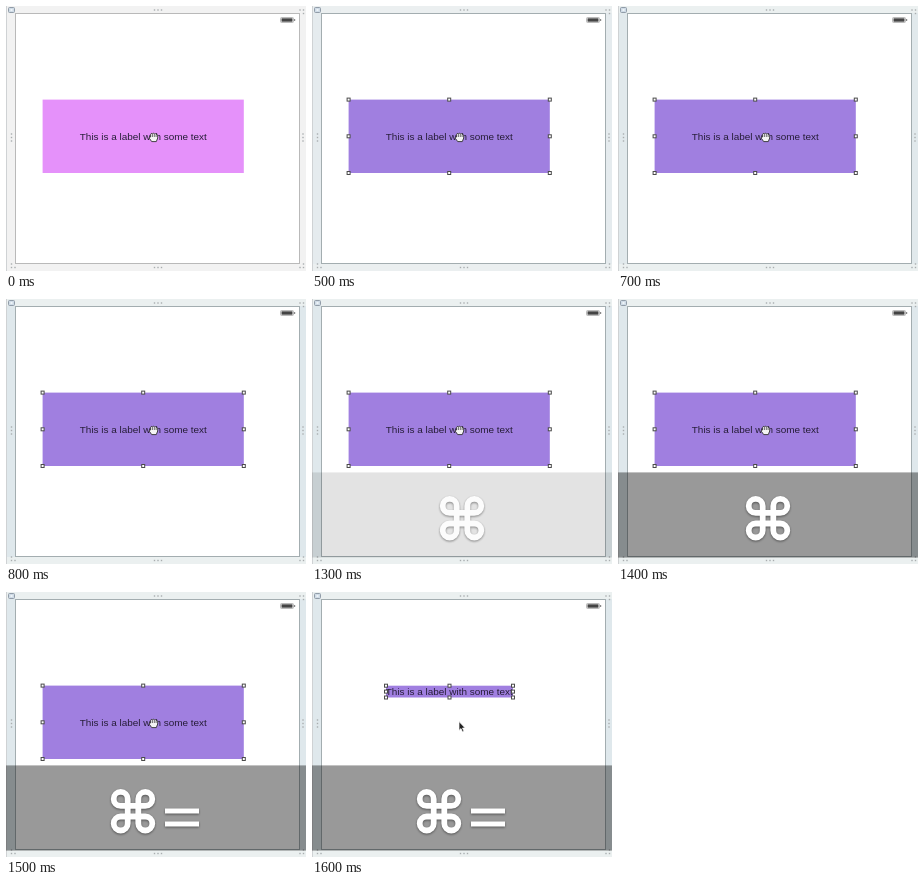
Write an HTML page that moves like this. It is 300 px wide and 265 px high and loops after 2 s.

```html
<!DOCTYPE html>
<html lang="en">
<head>
<meta charset="utf-8">
<title>Size to fit</title>
<style>
  html, body { margin: 0; width: 100%; height: 100%; overflow: hidden; background: #f2f2f2; }
  svg { display: block; width: 300px; height: 265px; }
  text { font: 9.95px "Liberation Sans", Arial, sans-serif; fill: #261d38; }
  .handle { fill: #fff; stroke: #4a4a4a; stroke-width: 1; }
  .keys { fill: none; stroke: #fff; stroke-width: 5.8; filter: drop-shadow(0 1px 1px rgba(0, 0, 0, .45)); }
</style>
</head>
<body>
<svg viewBox="0 0 300 265">
  <rect id="gutter" width="300" height="265"/>
  <path id="rails" d="M0 0H300V7H0ZM0 258H300V265H0Z"/>
  <path d="M.5 0V265" stroke="#cfd2d4"/>
  <rect id="board" x="9.5" y="7.5" width="284" height="250" fill="#fff"/>
  <g id="dots" fill="#a9adaf"></g>
  <rect x="2.5" y="1.5" width="6" height="5" rx="1" fill="#cfdbe6" stroke="#919ca8"/>
  <rect x="4.5" y="3" width="2" height="2" fill="#eef3f7"/>

  <rect x="274.5" y="11.5" width="13" height="5" rx="1" fill="#fff" stroke="#aaa" stroke-width=".8"/>
  <rect x="275.5" y="12.3" width="11" height="3.4" fill="#444"/>
  <rect x="288" y="13" width="1.2" height="2" fill="#888"/>

  <rect id="label"/>
  <text id="caption" x="73.8">This is a label with some text</text>
  <g id="handles"></g>

  <g id="hand" stroke="#333" stroke-width=".9" stroke-linejoin="round" fill="#f4f4f4">
    <path d="M144.6 131V128.2Q145.3 126.8 146.3 127.8Q147.2 126.6 148.3 127.8Q149.4 127 150.2 128.4Q151.7 128.2 151.7 129.8V132L150.3 135.6H145.7L143.3 132.2Q142.9 130.6 144.6 131Z"/>
    <path d="M146.4 128.2V131M148.3 128.2V131M150.1 128.7V131" stroke-width=".7"/>
  </g>
  <path id="arrow" d="M147 129.6V138.4L149 136.6L150.5 140L152 139.3L150.5 136H153.2Z" fill="#222" stroke="#fff" stroke-width=".7"/>

  <rect id="shade" y="173.4" width="300" height="85.2"/>
  <g id="keys" class="keys">
    <path id="command" d=""/>
    <path id="equals" d="M159 219H193M159 232H193" stroke-width="5.2"/>
  </g>
</svg>
<script>
  const LOOP = 2000;
  const $ = id => document.getElementById(id);
  const set = (id, attrs) => {
    for (const name in attrs) $(id).setAttribute(name, attrs[name]);
  };
  const show = (id, on) => set(id, { visibility: on ? "visible" : "hidden" });
  const make = (parent, attrs) => {
    const el = document.createElementNS("http://www.w3.org/2000/svg", "rect");
    for (const name in attrs) el.setAttribute(name, attrs[name]);
    $(parent).append(el);
    return el;
  };

  const dot = (x, y) => make("dots", { x: x - .7, y: y - .7, width: 1.4, height: 1.4 });
  for (const step of [-3.5, 0, 3.5]) {
    dot(152 + step, 4);
    dot(152 + step, 261.5);
    dot(5.5, 131.5 + step);
    dot(297, 131.5 + step);
  }
  const corners = [[297.5, 4, -1, 1], [5.5, 261.5, 1, -1], [297.5, 261.5, -1, -1]];
  for (const [x, y, dx, dy] of corners) {
    dot(x, y);
    dot(x + 3.5 * dx, y);
    dot(x, y + 3.5 * dy);
  }

  // Four looped corners joined into one square
  const h = 5.3, r = 7, far = h + r;
  const loops = [[-1, -1], [1, -1], [1, 1], [-1, 1]].map(([sx, sy]) =>
    `M${sx * h} ${sy * h}H${sx * far}A${r} ${r} 0 1 ${sx * sy > 0 ? 1 : 0} ${sx * h} ${sy * far}V${sy * h}`);
  set("command", { d: `${loops.join("")}M${-h} ${-h}H${h}V${h}H${-h}Z` });

  const spots = [[0, 0], [.5, 0], [1, 0], [0, .5], [1, .5], [0, 1], [.5, 1], [1, 1]];
  const handles = spots.map(() => make("handles", { class: "handle", width: 3, height: 3 }));

  // Time, gutter, rails, selected, shade opacity, key opacity, equals shown, fitted
  const steps = [
    [0, "#f2f2f2", "#f2f2f2", 0, 0, 0, 0, 0],
    [500, "#e5ebee", "#ebeff0", 1, 0, 0, 0, 0],
    [600, "#e3eaed", "#ebeff0", 1, 0, 0, 0, 0],
    [700, "#e1e9ec", "#ebf0f0", 1, 0, 0, 0, 0],
    [800, "#dfe8ec", "#ebf0f0", 1, 0, 0, 0, 0],
    [1300, "#dfe8ec", "#ebf0f0", 1, .11, .9, 0, 0],
    [1400, "#dfe8ec", "#ebf0f0", 1, .4, 1, 0, 0],
    [1500, "#dfe8ec", "#ebf0f0", 1, .4, 1, 1, 0],
    [1600, "#dfe8ec", "#ebf0f0", 1, .4, 1, 1, 1]
  ];

  function draw([, gutter, rails, selected, shade, keys, equals, fitted]) {
    const box = fitted ? { x: 74, y: 93.7, width: 127, height: 11.8 }
                       : { x: 36.6, y: 93.6, width: 201.2, height: 73.4 };
    set("gutter", { fill: gutter });
    set("rails", { fill: rails });
    set("board", { stroke: selected ? "#a3adb0" : "#b9b9b9" });
    set("label", { ...box, fill: selected ? "#a07fe0" : "#e591fa" });
    set("caption", { y: fitted ? 103 : 133.8 });
    spots.forEach(([u, v], i) => {
      handles[i].setAttribute("x", box.x + u * box.width - 1.5);
      handles[i].setAttribute("y", box.y + v * box.height - 1.5);
    });
    show("handles", selected);
    show("hand", !fitted);
    show("arrow", fitted);
    set("shade", { "fill-opacity": shade });
    set("keys", { opacity: keys });
    set("command", { transform: `translate(${equals ? 127 : 150} 219.2)` });
    show("equals", equals);
  }

  const start = performance.now();
  let current;
  function tick(now) {
    const t = Math.max(0, now - start) % LOOP;
    const next = steps.findLast(step => step[0] <= t);
    if (next !== current) draw(current = next);
    requestAnimationFrame(tick);
  }
  tick(start);
</script>
</body>
</html>
```
